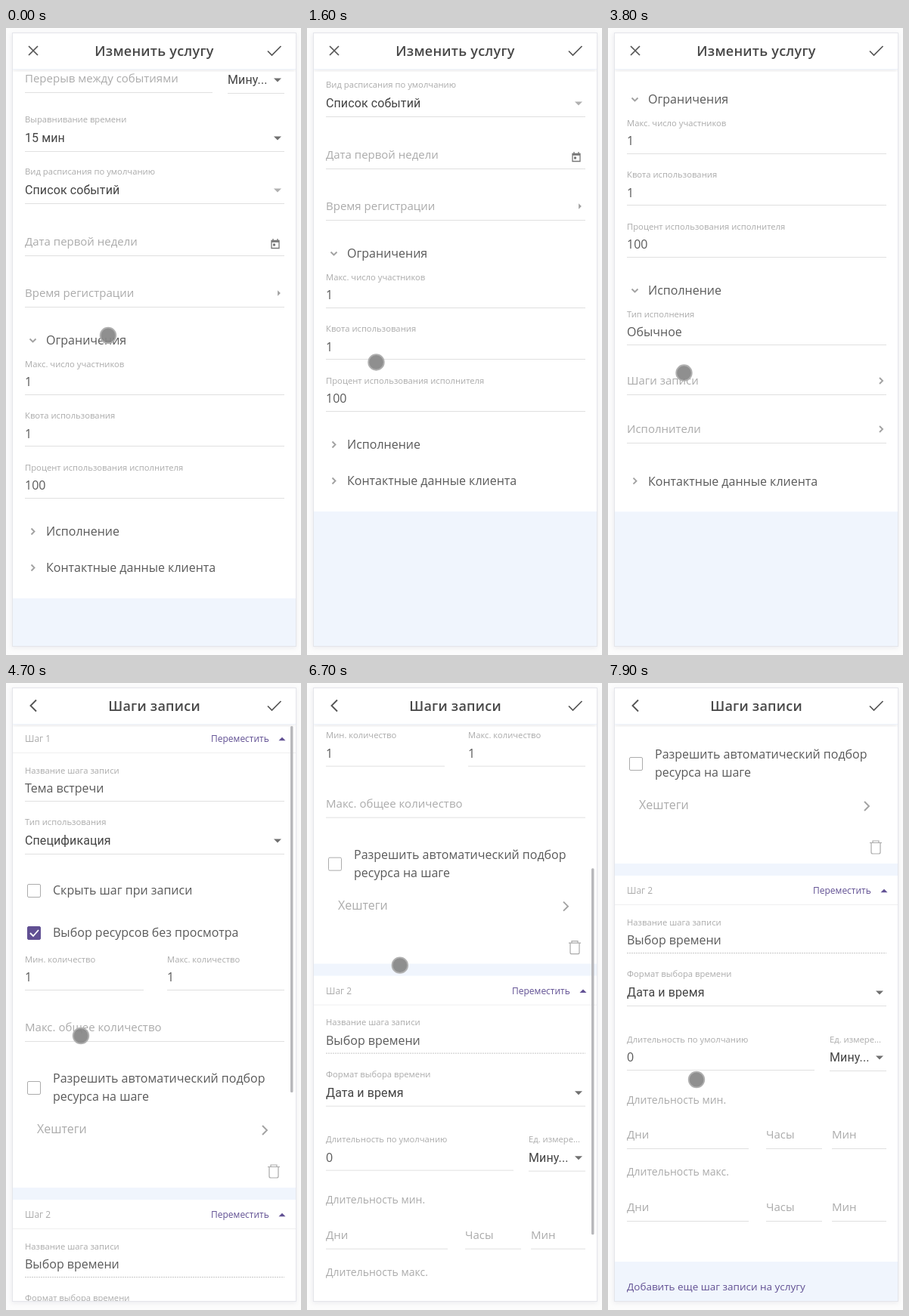
Write an HTML page that moves like this. It is 390 px wide and 830 px high and loops after 8 s.

```html
<!DOCTYPE html>
<html lang="ru">
<head>
<meta charset="utf-8">
<style>
html, body { margin: 0; width: 100%; height: 100%; overflow: hidden; background: #fcfcfc; }
svg { display: block; width: 390px; height: 830px; font-family: "Open Sans", sans-serif; }
.select { font-family: Roboto, sans-serif; letter-spacing: .1px; }
.title { font-weight: 550; letter-spacing: .25px; }
</style>
</head>
<body>
<svg viewBox="0 0 390 830">
  <defs>
    <clipPath id="view"><rect x="9" y="55" width="374" height="763"/></clipPath>
    <filter id="soft" x="-10%" y="-10%" width="120%" height="130%"><feGaussianBlur stdDeviation="3"/></filter>
  </defs>
  <rect x="7" y="7" width="377" height="814" fill="#ececf0" filter="url(#soft)"/>
  <rect x="8.5" y="6.5" width="375" height="812" fill="#f0f5fd" stroke="#e4e5ea"/>
  <g clip-path="url(#view)">
    <g id="form"></g>
    <g id="steps"></g>
    <rect x="9" y="50" width="374" height="6" fill="#c8c8cc" opacity=".5" filter="url(#soft)"/>
  </g>
  <rect id="thumb" x="376" y="57" width="3.5" height="485" rx="1.5" fill="#b8b8bb"/>
  <g id="header"></g>
  <circle id="cursor" r="10.3" fill="#868686" fill-opacity=".93" stroke="#b0b0b0" stroke-width="1.8"/>
</svg>
<script>
const $ = id => document.getElementById(id);
const INK = '#5a5a5a', DARK = '#444', HINT = '#ababab', PURPLE = '#615093';
const LEFT = 25, RIGHT = 368, ROW = 68.4;

function add(parent, tag, attrs, text) {
  const el = document.createElementNS('http://www.w3.org/2000/svg', tag);
  for (const k in attrs) el.setAttribute(k, attrs[k]);
  if (text) el.textContent = text;
  parent.append(el);
  return el;
}
// Text is placed by its vertical middle.
const write = (p, x, y, text, size = 16, fill = INK, extra = {}) =>
  add(p, 'text', { x, y: y + size * .34, 'font-size': size, fill, ...extra }, text);
const path = (p, d, stroke = INK, width = 1.5, extra = {}) =>
  add(p, 'path', { d, stroke, 'stroke-width': width, fill: 'none', ...extra });
const panel = (p, y, height, fill = '#fff') => add(p, 'rect', { x: 9, y, width: 374, height, fill });
const rule = (p, y, x = LEFT, end = RIGHT, stroke = '#e0e0e0', extra = {}) =>
  path(p, `M${x} ${Math.round(y) + .5}H${end}`, stroke, 1, extra);
const label = (p, y, text, x = LEFT) => write(p, x, y, text, 11.25, HINT);
const place = (x, y, turn = 0, scale = 1) => `translate(${x} ${y}) rotate(${turn}) scale(${scale})`;
const arrow = (p, x, y, fill = '#707070', turn = 0, scale = 1) =>
  add(p, 'path', { d: 'M-5-2.5H5L0 2.5Z', fill, transform: place(x, y, turn, scale) });
const chevron = (p, x, y, turn = 0, scale = 1) =>
  path(p, 'M-2-4L2 0L-2 4', '#a2a2a2', 1.9 / scale, { transform: place(x, y, turn, scale) });
// Draws items one below another at an even distance.
const stack = (y, gap, items, drawItem) => items.forEach((item, i) => drawItem(y + i * gap, item));

function field(p, y, name, value, x = LEFT, end = RIGHT) {
  label(p, y, name, x);
  write(p, x, y + 24, value);
  rule(p, y + 40, x, end);
}
function choice(p, y, value, x = LEFT, color) {
  write(p, x, y, value, 16, DARK, { class: 'select' });
  arrow(p, 359, y, color);
  rule(p, y + 17, x);
}
function select(p, y, name, value, color) {
  label(p, y, name);
  choice(p, y + 24.5, value, LEFT, color);
}
function hint(p, y, text, x = LEFT, end = RIGHT) {
  write(p, x, y, text, 15, HINT);
  rule(p, y + 18, x, end);
}
function heading(p, y, text, turn) {
  write(p, 53, y, text);
  return chevron(p, 35.5, y - .5, turn);
}
function check(p, y, on, ...lines) {
  const color = on ? PURPLE : '#acacac';
  add(p, 'rect', { x: 28.5, y: y - 8.5, width: 17, height: 17, rx: 1.5, fill: on ? color : '#fff', stroke: color });
  if (on) path(p, `M32 ${y}l4 4l7-8`, '#fff', 1.8);
  stack(y - 12 * (lines.length - 1), 24, lines, (ly, text) => write(p, 62, ly, text));
}

// Service form
const form = $('form'), EXTRA = 3 * ROW - 1;
const white = panel(form, 0, 755);
hint(form, 67, 'Перерыв между событиями', LEFT, 273);
choice(form, 69, 'Мину...', 293);
select(form, 121.5, 'Выравнивание времени', '15 мин');
select(form, 190.5, 'Вид расписания по умолчанию', 'Список событий', '#b0b0b0');
stack(283, 68, ['Дата первой недели', 'Время регистрации'], (y, text) => hint(form, y, text));
path(form, 'M351 281.5h10v10h-10zM351 283h10M353 279v2M359 279v2', '#777', 1.3);
add(form, 'rect', { x: 353, y: 285.5, width: 3, height: 3, fill: '#777' });
arrow(form, 361, 351, '#a2a2a2', -90, .75);
heading(form, 414, 'Ограничения', 90);
stack(445, ROW, [
  ['Макс. число участников', '1'],
  ['Квота использования', '1'],
  ['Процент использования исполнителя', '100']
], (y, item) => field(form, y, ...item));
const toggle = heading(form, 667, 'Исполнение');
const section = add(form, 'g', {});
field(section, 698, 'Тип исполнения', 'Обычное');
stack(786, 64, ['Шаги записи', 'Исполнители'], (y, text) => {
  hint(section, y, text);
  chevron(section, 361, y);
});
const contacts = add(form, 'g', {});
heading(contacts, 715, 'Контактные данные клиента');

// Booking steps
const steps = $('steps');
panel(steps, 0, 1300, '#f0f5fd');
panel(steps, 55, 613);
panel(steps, 684, 511);
stack(74, 630, ['Шаг 1', 'Шаг 2'], (y, text) => {
  write(steps, LEFT, y, text, 12, HINT);
  write(steps, 271, y, 'Переместить', 12, PURPLE);
  arrow(steps, 365, y, PURPLE, 180, .9);
  rule(steps, y + 18, 9, 383, '#efeff0');
});
field(steps, 116, 'Название шага записи', 'Тема встречи');
select(steps, 184.5, 'Тип использования', 'Спецификация');
check(steps, 275, false, 'Скрыть шаг при записи');
check(steps, 331, true, 'Выбор ресурсов без просмотра');
field(steps, 366, 'Мин. количество', '1', LEFT, 182);
field(steps, 366, 'Макс. количество', '1', 213);
hint(steps, 456, 'Макс. общее количество');
check(steps, 536, false, 'Разрешить автоматический подбор', 'ресурса на шаге');
write(steps, 41, 591, 'Хештеги', 16, HINT);
chevron(steps, 342, 592, 0, 1.5);
path(steps, 'M346 640.5h16M348 641v12q0 2 2 2h8q2 0 2-2v-12M350 640v-2h8v2', '#ababab', 1.2);

label(steps, 746, 'Название шага записи');
write(steps, LEFT, 770, 'Выбор времени');
rule(steps, 786, LEFT, RIGHT, '#c8c8c8', { 'stroke-dasharray': '2 1' });
select(steps, 814.5, 'Формат выбора времени', 'Дата и время');
field(steps, 901, 'Длительность по умолчанию', '0', LEFT, 273);
label(steps, 901, 'Ед. измере...', 293);
choice(steps, 925, 'Мину...', 293);
stack(981, 95.5, ['Длительность мин.', 'Длительность макс.'], (y, text) => {
  write(steps, LEFT, y, text, 14, HINT);
  hint(steps, y + 46, 'Дни', LEFT, 186);
  hint(steps, y + 46, 'Часы', 209, 283);
  hint(steps, y + 46, 'Мин', 296);
});
write(steps, LEFT, 1228, 'Добавить еще шаг записи на услугу', 13.5, PURPLE);

// Header
const header = $('header');
add(header, 'rect', { x: 9, y: 7, width: 374, height: 47, fill: '#fff' });
const title = write(header, 196, 30.5, ' ', 18, '#484848', { class: 'title', 'text-anchor': 'middle' });
const close = path(header, 'M30 24l12 12M42 24l-12 12', '#555', 1.7);
const back = path(header, 'M40 22.5l-7.5 7.5l7.5 7.5', '#555', 1.9);
path(header, 'M346 30.5l5.5 5.5l12-12', '#555', 1.7);

const LOOP = 8000, OPEN_AT = 2800, SWITCH_AT = 4400;
const START = { x: 135, y: 407 };
const go = (start, end, x, y) => ({ start, end, x, y });
const drag = (...args) => ({ ...go(...args), drag: true });
const moves = [
  go(100, 200, 135, 501), drag(200, 500, 131, 386),
  go(900, 1000, 111, 515), go(1100, 2300, 79, 396),
  go(2400, 2600, 96, 486), go(2600, 2800, 96, 552),
  go(2950, 3150, 100, 650), drag(3150, 3550, 102, 446), go(3600, 4200, 99, 467),
  go(5100, 5600, 114, 285),
  go(6100, 6400, 118, 670), drag(6400, 7020, 125, 241), go(7100, 7800, 117, 525)
];
const clamp = v => Math.max(0, Math.min(1, v));
const easeOut = k => Math.sin(clamp(k) * Math.PI / 2);

// Dragging scrolls the page by the distance the finger travels.
function pose(t, pageStart) {
  let { x, y } = START, scroll = 0;
  for (const m of moves) {
    const k = easeOut((t - m.start) / (m.end - m.start));
    const dy = (m.y - y) * k;
    x += (m.x - x) * k;
    y += dy;
    if (m.drag && m.start >= pageStart) scroll -= dy;
    if (t < m.end) break;
  }
  return { x, y, scroll };
}
const show = (el, on) => el.setAttribute('visibility', on ? 'visible' : 'hidden');
const shift = (el, x, y) => el.setAttribute('transform', `translate(${x} ${y})`);

function draw() {
  const t = performance.now() % LOOP;
  const onSteps = t >= SWITCH_AT;
  const { x, y, scroll } = pose(t, onSteps ? SWITCH_AT : 0);
  const open = clamp((t - OPEN_AT) / 200);
  for (const el of [form, close]) show(el, !onSteps);
  for (const el of [steps, back, $('thumb')]) show(el, onSteps);
  title.textContent = onSteps ? 'Шаги записи' : 'Изменить услугу';
  shift(onSteps ? steps : form, 0, -scroll);
  section.setAttribute('opacity', open);
  shift(contacts, 0, open * EXTRA);
  white.setAttribute('height', 755 + open * EXTRA);
  toggle.setAttribute('transform', place(35.5, 666.5, open * 90));
  shift($('thumb'), 0, scroll * .635);
  $('thumb').setAttribute('opacity', clamp((7500 - t) / 200));
  shift($('cursor'), x, y);
  requestAnimationFrame(draw);
}
draw();
</script>
</body>
</html>
```
